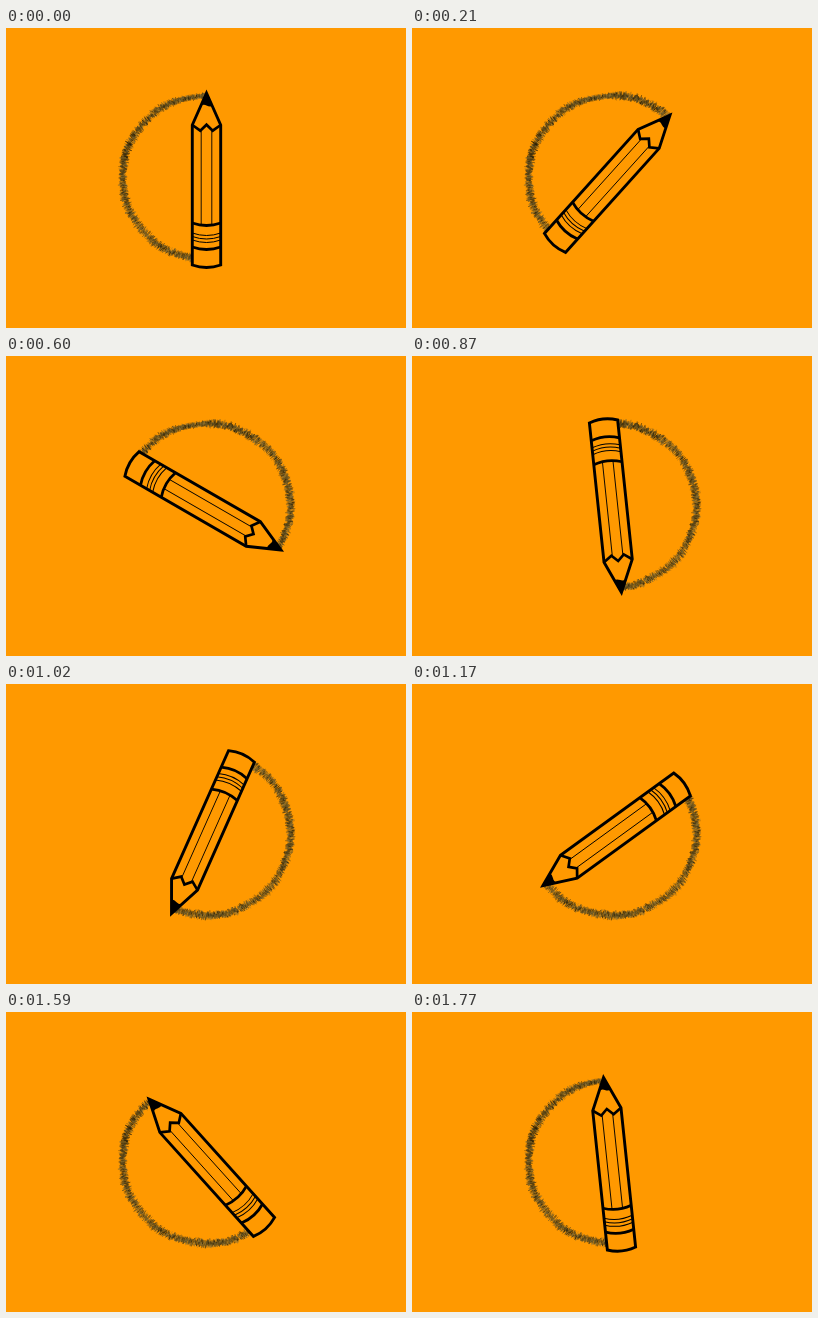
Animation, 400 px wide and 300 px high, one loop 1.8 s. Source, as an HTML page with a canvas:

```html
<!DOCTYPE html>
<html lang="en">
<head>
<meta charset="utf-8">
<title>Pencil drawing a circle</title>
<style>
html, body { margin: 0; height: 100%; overflow: hidden; background: #f90; }
canvas { display: block; }
</style>
</head>
<body>
<canvas id="stage" width="400" height="300"></canvas>
<script>
const LOOP = 1800, STEP = 30, TAU = Math.PI * 2;
const CX = 200.5, CY = 151;
const ORANGE = '#f90';
const ctx = document.getElementById('stage').getContext('2d');

let seed = 7;
function rand() {
  seed = (seed * 1664525 + 1013904223) % 4294967296;
  return seed / 4294967296;
}

// Chalky ring of short radial strokes; angles run clockwise from the top.
function makeRing() {
  const ring = document.createElement('canvas');
  ring.width = 400;
  ring.height = 300;
  const g = ring.getContext('2d');
  const tones = ['#2a2008', '#4a3a14', '#64501e', '#7a632a', '#907638'];
  const bump = (a, mid, width) => Math.exp(-(((a - mid) / width) ** 2));
  g.lineWidth = 0.9;
  for (let i = 0; i < 5200; i++) {
    const a = rand() * TAU;
    const half = 4.3 - 1.5 * bump(a, 6.15, 0.35);
    const off = (rand() + rand() - 1) * half + 0.4 * Math.sin(a * 9);
    const dark = 1 + 0.9 * bump(a, 5, 0.25) + 0.4 * bump(a, 0.3, 0.3);
    const reach = 0.6 + rand();
    const sin = Math.sin(a), cos = Math.cos(a);
    const x = 200.5 + (84 + off) * sin, y = 149.5 - (82 + off) * cos;
    g.strokeStyle = tones[Math.floor(5 * rand() ** dark)];
    g.globalAlpha = 0.4 + 0.4 * rand();
    g.beginPath();
    g.moveTo(x - reach * sin, y + reach * cos);
    g.lineTo(x + reach * sin, y - reach * cos);
    g.stroke();
  }
  return ring;
}
const ring = makeRing();

// Pencil parts, relative to the centre, tip upwards.
const outline = new Path2D('M0-86 14.2-54V86Q0 91-14.2 86V-54Z');
const lead = new Path2D('M0-86-6-73Q-3-75 0-73.5Q3-72 6-73Z');
const zigzag = new Path2D('M-14.2-54-6.2-48.3 0-54.3 6.2-48.3 14.2-54');
const grain = new Path2D('M-5.3-49V46M5.3-49V46');
const curve = y => `M-14.2 ${y}Q0 ${y + 5} 14.2 ${y}`;
const bands = new Path2D(curve(44) + curve(68));
const rings = new Path2D([54, 57.5, 61].map(curve).join(''));

function stroke(path, width) {
  ctx.lineWidth = width;
  ctx.stroke(path);
}

function drawTrail(angle) {
  ctx.save();
  ctx.beginPath();
  ctx.moveTo(CX, CY);
  ctx.arc(CX, CY, 120, angle - Math.PI * 1.5, angle - Math.PI / 2);
  ctx.clip();
  ctx.drawImage(ring, 0, 0);
  ctx.restore();
}

function drawPencil(angle) {
  ctx.save();
  ctx.translate(CX, CY);
  ctx.rotate(angle);
  ctx.fillStyle = ORANGE;
  ctx.fill(outline);
  ctx.fillStyle = ctx.strokeStyle = '#000';
  ctx.fill(lead);
  stroke(grain, 0.9);
  stroke(rings, 1);
  stroke(zigzag, 2.7);
  stroke(bands, 2.8);
  stroke(outline, 2.9);
  ctx.restore();
}

function draw() {
  const time = performance.now() % LOOP;
  const angle = Math.floor(time / STEP) * STEP / LOOP * TAU;
  ctx.fillStyle = ORANGE;
  ctx.fillRect(0, 0, 400, 300);
  drawTrail(angle);
  drawPencil(angle);
  requestAnimationFrame(draw);
}
draw();
</script>
</body>
</html>
```
